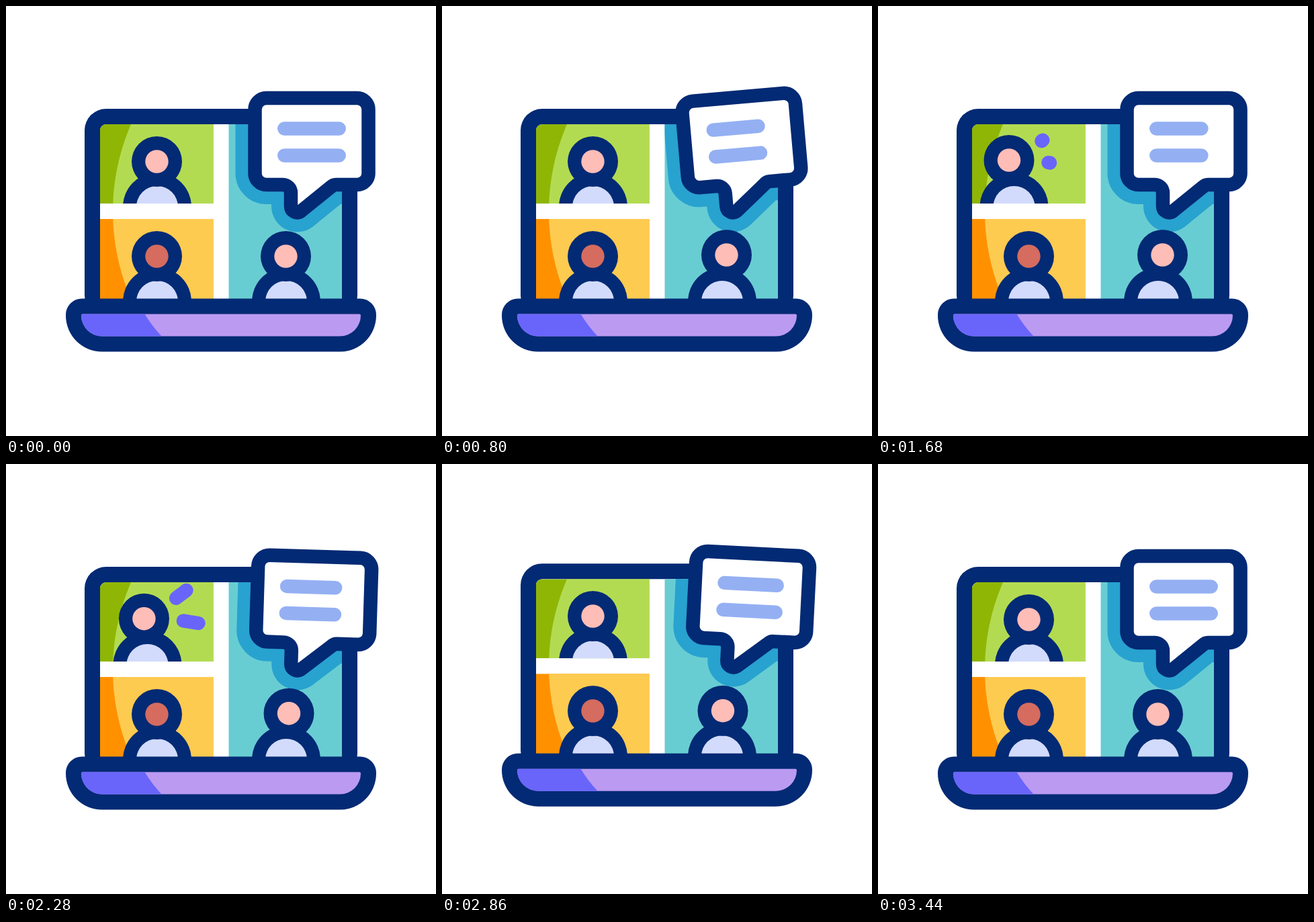
Animation, 640 px wide and 640 px high, one loop 3.6 s. Source, as an HTML page:

```html
<!DOCTYPE html>
<html lang="en">
<head>
<meta charset="utf-8">
<title>Video call</title>
<style>
  html, body { margin: 0; height: 100%; overflow: hidden; background: #fff; }
  svg { display: block; width: 100vw; height: 100vh; }
  .navy { fill: #032a74; }
  .shirt { fill: #d2dbfc; }
  .line { fill: none; stroke-linecap: round; stroke-width: 20.5; }
</style>
</head>
<body>
<svg viewBox="0 0 640 640">
  <defs>
    <clipPath id="topLeft"><path d="M149 176H308.5V294H140V185a9 9 0 0 1 9-9Z"/></clipPath>
    <clipPath id="bottomLeft"><path d="M140 317H308.5V436H140Z"/></clipPath>
    <clipPath id="right"><path d="M331.5 176H500V436H331.5Z"/></clipPath>
    <clipPath id="base"><path id="baseShape" d="M114 458.5H526a2 2 0 0 1 2 2a31 31 0 0 1-31 31H143a31 31 0 0 1-31-31a2 2 0 0 1 2-2Z"/></clipPath>
    <path id="bubbleShape" stroke-linejoin="round" d="M387.5 137H522.5a17 17 0 0 1 17 17V249a17 17 0 0 1-17 17H491Q487 266 484 269L439 305.4A9.4 9.4 0 0 1 424 298V278a12 12 0 0 0-12-12H387.5a17 17 0 0 1-17-17V154a17 17 0 0 1 17-17Z"/>
    <g id="body">
      <circle class="navy" cx="225" cy="299" r="51"/>
      <circle class="shirt" cx="225" cy="299" r="31"/>
    </g>
    <g id="head">
      <circle class="navy" cx="224.5" cy="231.5" r="37.5"/>
      <circle cx="224.5" cy="231.5" r="17.2"/>
    </g>
  </defs>
  <g id="scene">
    <rect class="navy" x="117" y="153" width="406" height="310" rx="32"/>
    <path fill="#fff" d="M149 176H500V436H140V185a9 9 0 0 1 9-9Z"/>

    <g clip-path="url(#topLeft)">
      <rect fill="#8fb605" x="140" y="176" width="169" height="118"/>
      <circle fill="#b3db52" cx="485" cy="306" r="326"/>
      <g id="guest">
        <g stroke="#6965fb">
          <path class="line spark" d="M266 201L283 188"/>
          <path class="line spark" d="M276 233L301 237"/>
        </g>
        <use href="#body"/>
        <use id="guestHead" href="#head" fill="#ffbdb7"/>
      </g>
    </g>

    <g clip-path="url(#bottomLeft)">
      <rect fill="#ff9100" x="140" y="317" width="169" height="119"/>
      <circle fill="#fecb51" cx="485" cy="306" r="326"/>
      <g transform="translate(0 141)">
        <use href="#body"/>
        <use id="listenerHead" href="#head" fill="#d56c5f"/>
      </g>
    </g>

    <g clip-path="url(#right)">
      <rect fill="#68cdd2" x="331" y="176" width="170" height="260"/>
      <use class="swing" href="#bubbleShape" fill="#28a2cf" stroke="#28a2cf" stroke-width="58"/>
      <g transform="translate(192 141)">
        <use href="#body"/>
        <use id="speakerHead" href="#head" fill="#ffbdb7"/>
      </g>
    </g>

    <path class="navy" d="M113 435.5H527a24 24 0 0 1 24 24V460.5a54 54 0 0 1-54 54H143a54 54 0 0 1-54-54V459.5a24 24 0 0 1 24-24Z"/>
    <use href="#baseShape" fill="#bb9af2"/>
    <path clip-path="url(#base)" fill="#6965fb" d="M100 450H201L206.5 458.5Q217 476 232 492H100Z"/>

    <g class="swing">
      <use href="#bubbleShape" fill="#fff" stroke="#032a74" stroke-width="20.5"/>
      <path id="text" class="line" stroke="#94b0f3"/>
    </g>
  </g>
</svg>
<script>
const LOOP = 3600;
const $ = id => document.getElementById(id);
const swingers = document.querySelectorAll('.swing');
const sparks = [...document.querySelectorAll('.spark')].map(el => ({ el, length: el.getTotalLength() }));

const ease = p => (1 - Math.cos(Math.PI * Math.min(1, Math.max(0, p)))) / 2;
const move = (el, x, y) => el.setAttribute('transform', `translate(${x} ${y})`);

// Sum of 200 ms eased steps: 0 to 1 at even entries, back to 0 at odd ones
const toggle = (t, ...starts) =>
  starts.reduce((sum, start, i) => sum + (i % 2 ? -1 : 1) * ease((t - start) / 200), 0);

// Bubble angle: ease out to 5 degrees, rock back and forth, settle
function swingAngle(t) {
  if (t < 0 || t > 1200) return 0;
  if (t < 200) return 5 * ease(t / 200);
  if (t > 1000) return 5 * ease((1200 - t) / 200);
  return 5 * Math.cos(Math.PI * (t - 200) / 200);
}

const hop = t => toggle(t, 2400, 2600, 2800, 3000);

function drawSparks(t) {
  const phase = (t - 1240) % 400;
  const active = t > 1240 && t < 2440;
  const from = ease((phase - 200) / 200);
  const to = ease(phase / 200);
  for (const { el, length } of sparks) {
    el.style.display = active && to - from > 0.01 ? '' : 'none';
    el.setAttribute('stroke-dasharray', `0 ${from * length} ${(to - from) * length} 999`);
    // Skip the zero-length dash so its round cap stays hidden
    el.setAttribute('stroke-dashoffset', 0);
    if (from > 0) {
      el.setAttribute('stroke-dasharray', `${(to - from) * length} 999`);
      el.setAttribute('stroke-dashoffset', -from * length);
    } else {
      el.setAttribute('stroke-dasharray', `${to * length} 999`);
    }
  }
}

function draw(t) {
  const angle = swingAngle(t) + swingAngle(t - 2200);
  const talk = toggle(t, 200, 2200, 2800, 3240);
  const lean = toggle(t, 1000, 2200);
  const tilt = toggle(t, 1040, 2200);
  const lift = -5.5 * hop(t - 40);

  move($('scene'), 0, -22.8 * hop(t));
  swingers.forEach(el => el.setAttribute('transform', `rotate(${angle} 433 305)`));
  const end = 495.7 - 14.3 * talk;
  $('text').setAttribute('d', `M414.3 182.5H${end}M414.3 222.5H${end}`);

  move($('guest'), -22.5 * lean, 0);
  move($('guestHead'), -7 * tilt, -2 * tilt + lift);
  move($('listenerHead'), 0, lift);
  move($('speakerHead'), 7 * talk, -2 * talk);
  drawSparks(t);
}

function tick() {
  draw(performance.now() % LOOP);
  requestAnimationFrame(tick);
}
tick();
</script>
</body>
</html>
```
